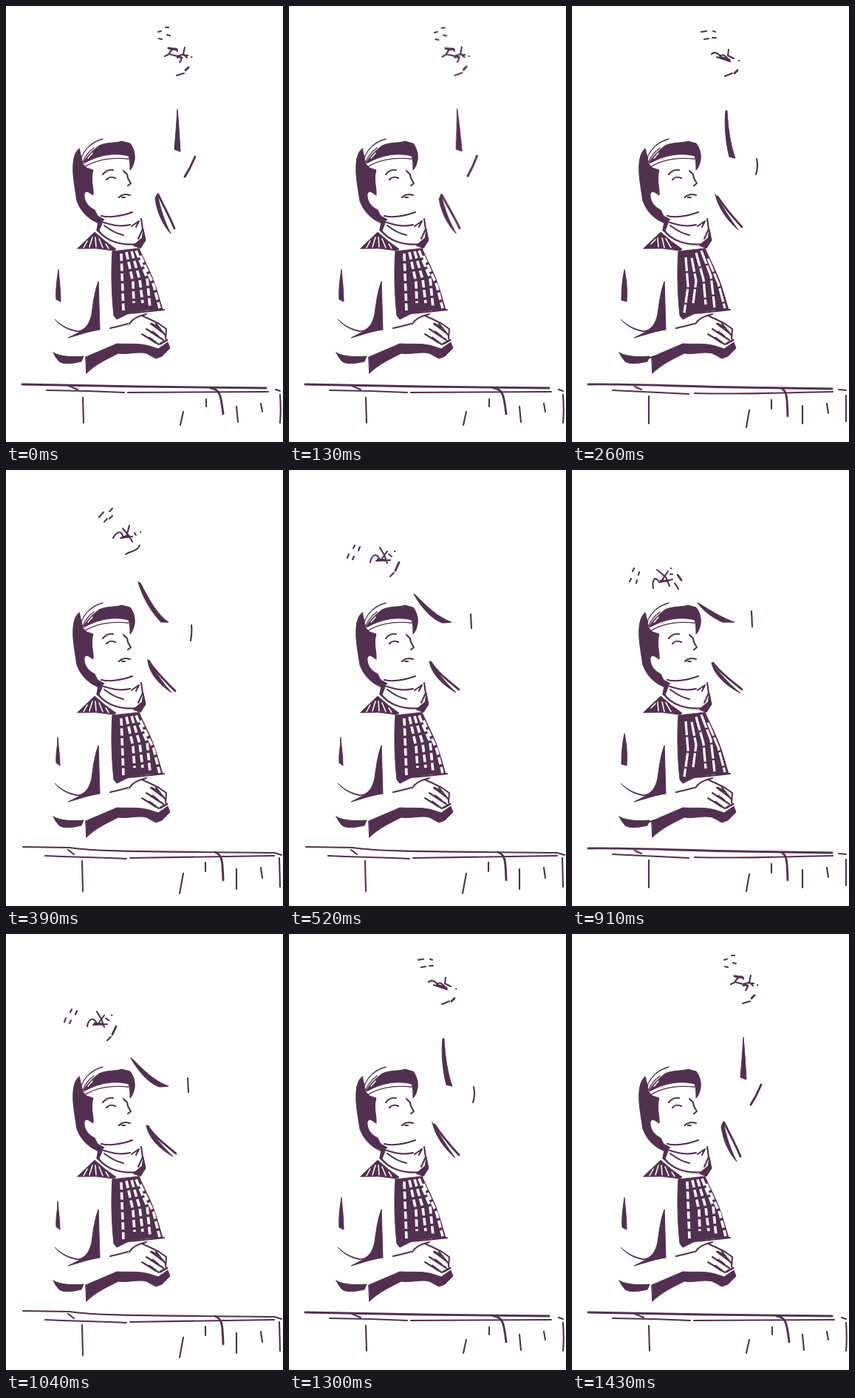
These frames come from a looping animation (375 px wide and 590 px high, 1560 ms). An HTML page:

```html
<!DOCTYPE html>
<html lang="en">
<head>
<meta charset="utf-8">
<title>Waving figure</title>
<style>
html, body { margin: 0; width: 100%; height: 100%; overflow: hidden; background: #fff; }
svg { display: block; width: 375px; height: 590px; }
path { fill: none; stroke: #523050; stroke-width: 2.1; stroke-linecap: round; stroke-linejoin: round; }
.f { fill: #523050; stroke-width: 1; }
.b { stroke-width: 2.9; }
.t { stroke-width: 1.4; }
.w { stroke: #fff; stroke-width: 1.5; }
.cell { stroke: #fff; stroke-width: 3.6; stroke-linecap: butt; stroke-dasharray: 10 3.5; }
.long { stroke-width: 3.2; stroke-dasharray: 19 2.5; }
.pose { visibility: hidden; animation: 1560ms step-end infinite; }
.arm { transform-origin: 225px 235px; }

/* twelve drawings of 130 ms each */
#bodyA { animation-name: bodyA; }
#bodyB { animation-name: bodyB; }
#bodyC { animation-name: bodyC; }
#up { animation-name: up; }
#tilt { animation-name: tilt; }
#lean { animation-name: lean; }
#low { animation-name: low; }
#down { animation-name: down; }
@keyframes bodyA {
  0%, 41.666%, 83.333%, 100% { visibility: visible; }
  16.666%, 58.333% { visibility: hidden; }
}
@keyframes bodyB {
  0%, 25%, 66.666%, 100% { visibility: hidden; }
  16.666%, 58.333% { visibility: visible; }
}
@keyframes bodyC {
  0%, 41.666%, 83.333%, 100% { visibility: hidden; }
  25%, 66.666% { visibility: visible; }
}
@keyframes up {
  0%, 91.666%, 100% { visibility: visible; transform: none; }
  8.333% { visibility: visible; transform: rotate(-2.6deg); }
  16.666% { visibility: hidden; transform: none; }
}
@keyframes tilt {
  0%, 25%, 91.666%, 100% { visibility: hidden; }
  16.666%, 83.333% { visibility: visible; }
}
@keyframes lean {
  0%, 33.333%, 83.333%, 100% { visibility: hidden; }
  25%, 75% { visibility: visible; }
}
@keyframes low {
  0%, 41.666%, 75%, 100% { visibility: hidden; }
  33.333%, 66.666% { visibility: visible; }
}
@keyframes down {
  0%, 66.666%, 100% { visibility: hidden; transform: none; }
  41.666%, 58.333% { visibility: visible; transform: none; }
  50% { visibility: visible; transform: rotate(-.8deg); }
}
</style>
</head>
<body>
<svg viewBox="0 0 375 590">
  <!-- head -->
  <path class="f" d="M99 193C92 199 90 210 91 228C92 240 94 251 96 264C102 280 114 290 126 294L133 289L124 284L120 276C112 272 107 266 106 258C105 252 109 250 112 252L118 256C119 246 114 236 118 222L109 219L104 214L102 205Z"/>
  <path class="f" d="M105 212C109 203 117 196 126 189C136 184 148 186 157 183L168 186C173 192 175 201 174 208C173 214 171 219 168 222C168 214 168 209 166 203C148 198 126 201 105 213Z"/>
  <path class="t" d="M101 209C104 196 115 184 131 180M104 211C107 203 112 197 119 192"/>
  <path class="w" d="M111 206L117 199"/>
  <path class="t" d="M105 219C118 209 141 204 166 207"/>
  <path d="M131 228C134 224 139 221 145 222M136 235C139 231 144 231 148 233"/>
  <path d="M159 223L164 228L165 233L169 240L165 243"/>
  <path d="M153 259C157 255 162 254 168 256M157 259L161 259"/>

  <!-- collar -->
  <path d="M129 284C142 287 157 284 171 279M126 290L124 303C134 316 152 325 178 322L188 316M129 292C140 295 151 300 168 296M133 297C142 304 149 308 159 310M170 298L180 291L176 299M183 288L185 302L179 315"/>
  <path class="f" d="M186 302L189 317L182 328L172 324L184 314Z"/>
  <path class="f" d="M126 290L130 294L126 304L130 309L123 304Z"/>

  <!-- coat -->
  <path class="f" d="M125 373C120 386 118 402 116 417C113 431 107 438 98 440C86 438 75 433 66 424C75 434 87 440 100 441L84 449C96 446 112 440 127 438L126 404Z"/>
  <path class="f" d="M64 469C74 475 90 475 105 474L102 481C90 484 77 485 72 481Q67 476 64 469Z"/>
  <path class="f" d="M108 475L150 457C165 458 180 456 194 460L206 464L219 455L222 463L211 474L203 477L190 470C178 467 165 472 152 470C136 478 121 485 109 497Z"/>
  <path d="M141 436C150 434 158 432 165 430"/>

  <!-- hands -->
  <path d="M167 430C172 422 180 419 190 417M184 419L195 424L207 430L217 437L216 450M196 430L212 442M190 437L213 452M184 444L207 458M203 430L216 446"/>
  <path class="b" d="M197 430L206 435M198 441L206 447M194 449L202 455M209 457L218 452"/>

  <!-- scarf -->
  <path class="f" d="M97 328L120 306L134 318L149 329L146 331L122 328Z"/>
  <path class="f" d="M144 332L180 328C188 346 198 364 204 384L212 411L190 412L168 415L150 424L146 419C143 390 142 360 144 332Z"/>
  <path d="M165 416L187 414L214 411"/>

  <g id="bodyA" class="pose">
    <path class="f" d="M71 357C69 370 67 385 68 397L74 400C74 384 72 370 71 357Z"/>
    <path class="cell" d="M156 335L159 412M163 333L172 374L173 402M170 332L181 370L185 402M176 331L191 368L195 408M182 338L200 378L208 409"/>
    <path class="w" d="M105 327L110 318M113 326L117 313M122 326L121 313M131 327L126 315M139 328L135 322"/>
    <path class="b" d="M22 512L180 515L352 517"/>
    <path d="M55 520L110 521L160 523M165 523L355 522M85 514L97 519M365 519L371 521"/>
    <path d="M104 530L105 564M240 549L236 567M271 532L271 542M312 542L314 563M345 538L347 549M371 526C372 540 372 553 371 564"/>
    <path class="b" d="M277 517C289 518 291 526 294 552"/>
  </g>

  <g id="bodyB" class="pose">
    <path class="f" d="M71 357C68 370 67 385 67 398L74 400C75 384 74 370 71 357Z"/>
    <path class="cell long" d="M154 340L157 380L152 415M162 341L168 372L164 402M168 334L178 370L181 404M175 331L188 365L193 408M184 342L198 375L207 409"/>
    <path class="w" d="M107 322L113 316M117 326L116 314M125 327L122 314M134 327L127 315"/>
    <path d="M91 480L112 474"/>
    <path class="b" d="M22 512C90 511 155 516 352 518"/>
    <path d="M55 520L158 525M166 524C230 526 290 523 353 522M85 515L94 519M361 519L371 520"/>
    <path d="M104 528L104 565M240 547L236 570M270 533L270 545M312 541L312 565M345 538L347 551M371 527L371 562"/>
    <path class="b" d="M283 517C292 521 291 533 292 555"/>
  </g>

  <g id="bodyC" class="pose">
    <path class="f" d="M70 362C70 374 67 386 68 396L73 400C73 387 71 376 70 362Z"/>
    <path class="cell" d="M156 336L159 413M163 334L172 374L174 403M170 333L181 370L185 403M176 332L191 368L195 409M182 339L200 378L208 410"/>
    <path class="w" d="M105 327L110 318M113 326L117 313M122 326L121 313M131 327L126 315M139 328L135 322"/>
    <path d="M23 510L86 511C126 517 197 516 363 518M53 522C90 524 123 524 163 526M168 525L363 522M84 514L92 520M363 518L373 521"/>
    <path d="M103 529L104 570M240 546L235 573M270 531L270 543M312 540L312 567M345 538L347 552M370 525L371 564"/>
    <path class="b" d="M283 517C294 521 293 533 294 555"/>
  </g>

  <!-- raised arm -->
  <g id="up" class="pose arm">
    <path d="M206 35L210 34M216 29L220 29M207 44L211 45M218 39L222 40M251 69L251.4 69"/>
    <path d="M215 68L221 65L232 68L238 66L246 67M221 64C225 57 231 55 232 61M232 70C238 67 239 72 235 76M242 56L240 65L245 70M231 94L241 91"/>
    <path class="b" d="M220 57L231 59M233 68L238 70M243 87L247 83"/>
    <path class="f" d="M232 140L230 170L228 194L236 197C235 180 234 160 232 140Z"/>
    <path class="b" d="M256 204L249 219L242 231"/>
    <path class="f" d="M205 254L202 260C204 278 212 296 223 308C215 292 209 276 205 254Z"/>
    <path class="b" d="M206 255C213 270 222 286 228 301"/>
  </g>

  <g id="tilt" class="pose arm">
    <path d="M175 35L182 34M191 34L194 35M179 45L185 44M190 43L195 43M226 74L226.4 74"/>
    <path d="M189 65C193 61 198 64 203 70M196 69L205 72L214 75M200 69C203 64 207 66 212 73M212 59L211 67L219 71M207 95L217 91"/>
    <path class="b" d="M204 70L213 73M220 91L224 87"/>
    <path class="f" d="M208 142C206 162 208 185 213 204L221 206C215 190 211 165 210 142Z"/>
    <path d="M250 207C252 215 251 222 249 228"/>
    <path class="f" d="M194 255C198 273 210 290 225 303C214 288 204 272 194 255Z"/>
    <path class="b" d="M197 258C208 275 219 287 230 299"/>
  </g>

  <g id="lean" class="pose arm">
    <path d="M126 64L132 57M140 56L144 52M133 70L137 66M140 66L144 62M182 84L182.4 84"/>
    <path d="M145 92C149 84 156 81 158 89M155 92L171 90M167 75L163 90M158 79L167 90L171 97M174 85L176 88M162 114C168 110 178 110 181 102"/>
    <path class="b" d="M158 91L166 89"/>
    <path class="f" d="M179 152C185 172 195 190 210 206L220 206C205 196 194 176 182 153Z"/>
    <path d="M251 210C252 218 251 225 250 231"/>
    <path class="f" d="M192 257C193 274 207 290 224 301C212 288 202 273 192 257Z"/>
    <path class="b" d="M193 258C203 274 217 287 229 299"/>
  </g>

  <g id="low" class="pose arm">
    <path d="M79 119L81 114M87 106L89 102M86 121L88 117M94 109L96 104M143 110L143.4 110"/>
    <path d="M110 125C111 117 117 111 122 119M118 123L137 122M123 105L129 115L133 126M133 110L125 121M135 114L139 117M137 144L142 139"/>
    <path class="b" d="M120 121L131 122M144 136L149 125"/>
    <path class="f" d="M169 168C180 187 193 202 208 207L220 206C201 199 187 185 171 169Z"/>
    <path d="M246 195L247 214"/>
    <path class="f" d="M190 259C193 276 208 291 226 301C212 288 201 274 190 259Z"/>
    <path class="b" d="M192 260C201 275 217 286 230 297"/>
  </g>

  <g id="down" class="pose arm">
    <path d="M78 151L80 147M82 137L84 133M87 153L88 149M90 142L91 138M134 133L134.4 133"/>
    <path d="M110 160C108 150 112 143 117 150M118 152L136 148M115 135L127 145L132 157M130 137L122 149M133 141L136 141M139 153L144 161"/>
    <path class="b" d="M120 150L130 150M143 142L148 149"/>
    <path class="f" d="M170 180C180 193 191 200 204 206L220 206C206 201 190 192 171 180Z"/>
    <path d="M243 191L244 212"/>
    <path class="f" d="M189 261C192 276 207 291 228 302C212 289 200 275 189 261Z"/>
    <path class="b" d="M191 261C201 275 217 286 230 297"/>
  </g>
</svg>
</body>
</html>
```
